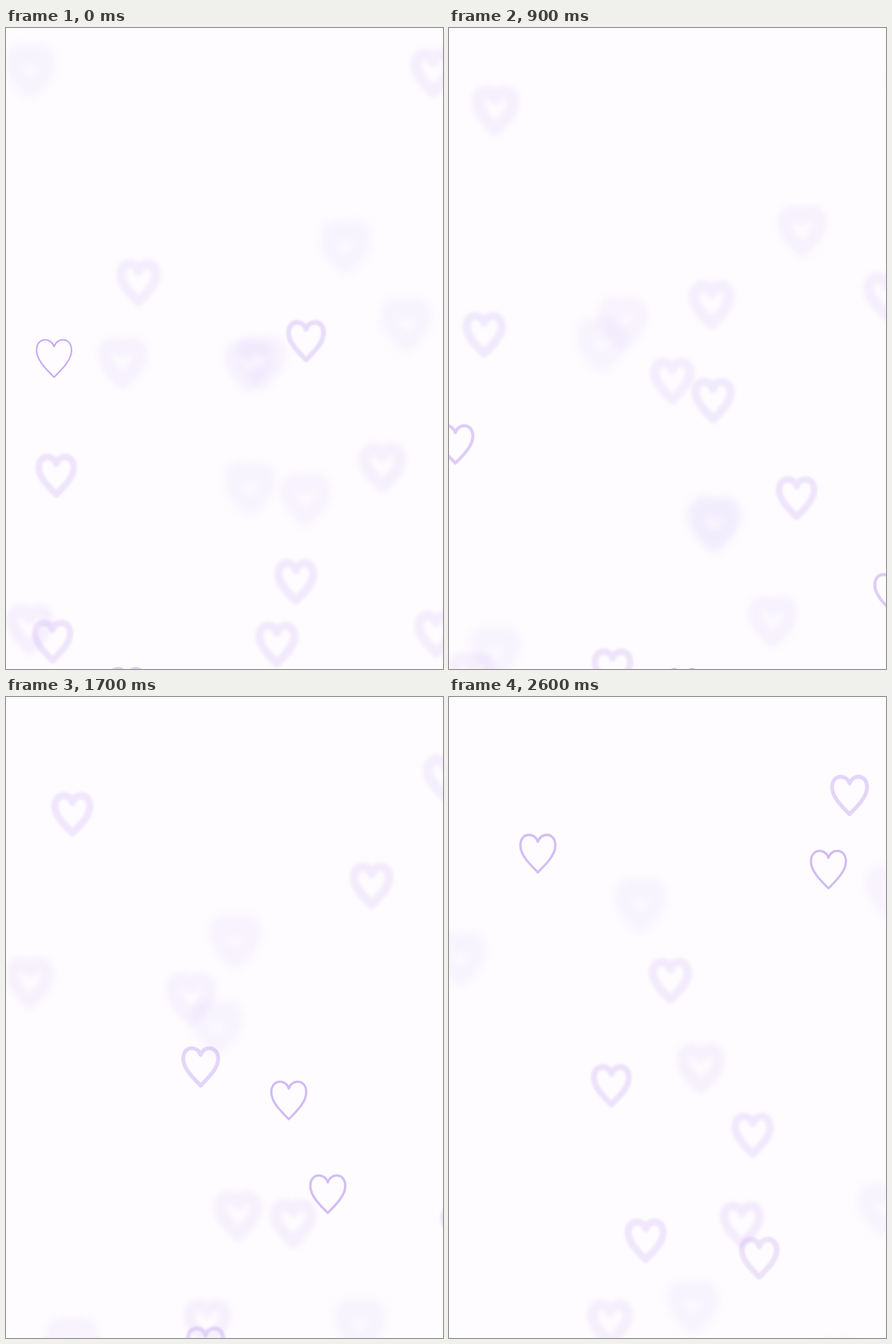
Animation of 600x881 px, one loop 2700 ms. Source, as an HTML page with a canvas:

```html
<!DOCTYPE html>
<html lang="en">
<head>
<meta charset="utf-8">
<title>Drifting hearts</title>
<style>
  html, body { margin: 0; width: 100%; height: 100%; overflow: hidden; background: #fefcff; }
  canvas { display: block; width: 600px; height: 881px; }
</style>
</head>
<body>
<canvas id="stage" width="600" height="881"></canvas>
<script>
const ctx = document.getElementById('stage').getContext('2d');
const LOOP = 2700, STEP = 100;
const FOCUS_CYCLE = 2 * LOOP, MAX_SPREAD = 17;

// Start and end of each straight path, in the order the hearts come into focus
const paths = [
  [66, 454, 15, 360], [166, 906, 335, 838], [696, 393, 608, 268],
  [69, 615, -105, 491], [372, 847, 226, 1019], [591, 833, 642, 670],
  [374, 954, 221, 861], [517, 604, 402, 725], [334, 464, 417, 602],
  [351, 459, 223, 534], [550, 408, 696, 294], [33, 59, 122, 215],
  [466, 301, 521, 237], [704, 67, 550, 135], [335, 633, 426, 771],
  [411, 648, 270, 747], [160, 460, 304, 390], [33, 826, 121, 922],
  [587, 62, 733, 119], [182, 350, 346, 510], [398, 761, 533, 918],
  [64, 843, -32, 986], [412, 430, 263, 286], [727, 772, 597, 704]
];

const outline = new Path2D(
  'M0-16 C-2-23-8-25.5-12-25.5 C-19-25.5-24-20-24-11 C-24 2-12 14 0 26 ' +
  'C12 14 24 2 24-11 C24-20 19-25.5 12-25.5 C8-25.5 2-23 0-16Z');

const lerp = (a, b, k) => a + (b - a) * k;

// How far out of focus a heart is: evenly staggered, growing with the time to its sharp moment
function spreadAt(index, time) {
  const sharpAt = index / paths.length * FOCUS_CYCLE;
  const gap = Math.abs(time - sharpAt);
  const nearest = Math.min(gap, FOCUS_CYCLE - gap);
  return MAX_SPREAD * Math.min(1, 1.25 * nearest / LOOP);
}

// Defocus widens and fades the line, with slightly soft edges
function drawHeart(x, y, spread) {
  const width = 2 + 1.3 * spread;
  ctx.save();
  ctx.translate(x, y);
  ctx.lineWidth = width;
  ctx.globalAlpha = Math.min(1, 2.4 / width);
  ctx.filter = spread > 0.5 ? `blur(${(0.3 * spread).toFixed(2)}px)` : 'none';
  ctx.stroke(outline);
  ctx.restore();
}

function draw(time) {
  const progress = time / (LOOP - STEP);
  ctx.fillStyle = '#fefcff';
  ctx.fillRect(0, 0, 600, 881);
  ctx.strokeStyle = '#c4a8f0';
  ctx.lineJoin = 'round';
  paths.forEach(([x0, y0, x1, y1], i) =>
    drawHeart(lerp(x0, x1, progress), lerp(y0, y1, progress), spreadAt(i, time)));
}

const start = performance.now();
function tick() {
  const elapsed = (performance.now() - start) % LOOP;
  draw(Math.floor(elapsed / STEP) * STEP);
  requestAnimationFrame(tick);
}
tick();
</script>
</body>
</html>
```
